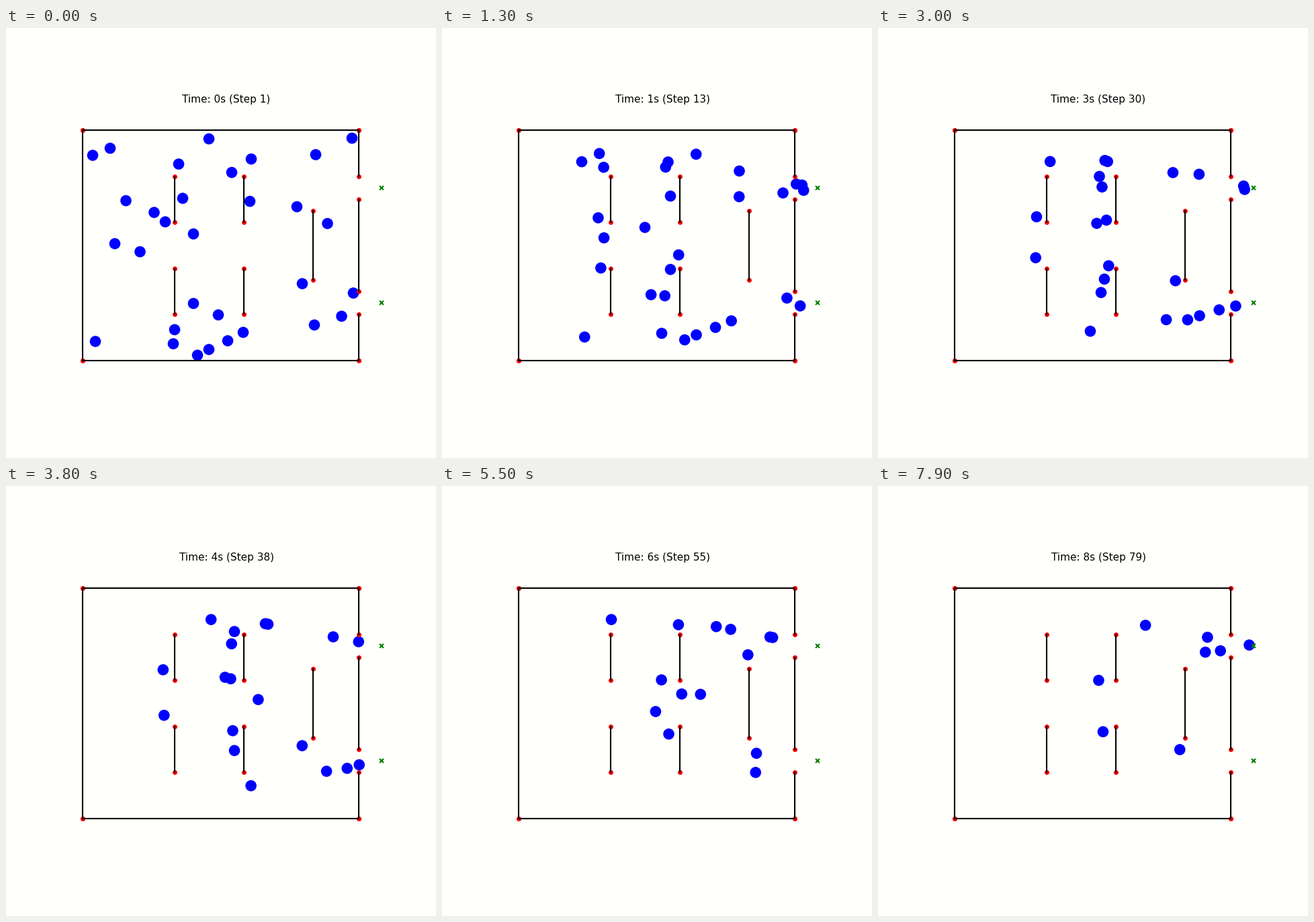
Animation of 640x640 px, one loop 8 s. Source, as a matplotlib script:

```python
import matplotlib.pyplot as plt
import numpy as np
from matplotlib.animation import FuncAnimation
from matplotlib.patches import Circle

FRAMES, SPEED = 80, 6.12          # pixels walked per frame
UNIT, LEFT, BOTTOM = 34.23, 114.4, 494.6
RADIUS = 8.3


def to_px(x, y):
    return LEFT + UNIT * x, BOTTOM - UNIT * y


# Inner walls: column, upper end, lower end
INNER = [(4, 8, 6), (4, 4, 2), (7, 8, 6), (7, 4, 2), (10, 6.5, 3.5)]
WALLS = [
    ((0, 0), (0, 10)), ((0, 10), (12, 10)), ((0, 0), (12, 0)),
    ((12, 10), (12, 8)), ((12, 7), (12, 3)), ((12, 2), (12, 0)),
] + [((x, a), (x, b)) for x, a, b in INNER]
DOORS = [to_px(13, 7.5), to_px(13, 2.5)]
GATE_X = to_px(12, 0)[0]

# Starting places of those who walk straight out
FREE = [
    (155, 179), (302, 165), (257, 202.5), (365, 195), (461, 188.5),
    (515, 164), (178.5, 257), (363, 258), (433, 266), (478.5, 291),
    (441, 380.5), (517, 394.5), (499.5, 429), (459, 442), (249, 470),
    (133, 466.5), (285, 487), (302, 478.5), (330, 465.5), (353, 453),
]
# Start, door (0 upper, 1 lower), column that holds them up, frames held
HELD = [
    ((129, 189.5), 0, 4, 9), ((336, 215), 0, 7, 38),
    ((220.5, 274.5), 0, 4, 40), ((237, 288.5), 0, 7, 90),
    ((263, 253.5), 0, 7, 35), ((279, 306.5), 1, 10, 20),
    ((162, 321), 0, 7, 20), ((199.5, 333), 1, 4, 35),
    ((279, 410), 0, 7, 16), ((316, 427), 0, 7, 32),
    ((251, 449), 0, 7, 90),
]

rng = np.random.default_rng(4)


def shuffle(n):
    """Random walk that ends where it began, never into the wall."""
    drift = np.cumsum(rng.normal(0, 2.5, (n, 2)), axis=0)
    drift -= np.linspace(drift[0], drift[-1], n)
    drift[:, 0] = -abs(drift[:, 0])
    return drift


def walk(start, door, column=None, wait=0):
    """Positions per frame: round the wall ends, through the gate, to the door."""
    door_x, door_y = DOORS[door]
    keys, hold = [(0, *start)], None

    def go(x, y):
        t, x0, y0 = keys[-1]
        keys.append((t + np.hypot(x - x0, y - y0) / SPEED, x, y))

    def gate_y():
        return np.clip(keys[-1][2], door_y - 6, door_y + 6)

    for col, a, b in INNER:
        wall_x, top = to_px(col, a)
        low = to_px(col, b)[1]
        x, y = keys[-1][1:]
        if x >= wall_x:
            continue
        hit = y + (gate_y() - y) * (wall_x - x) / (GATE_X - x)
        if not top - 20 < hit < low + 20:
            continue
        if col == column:
            go(wall_x - 14, hit)
            t = keys[-1][0]
            hold = int(np.ceil(t))
            keys.append((t + wait, wall_x - 14, hit))
        deep = top + 10 < hit < low - 10
        over = door == 0 if deep else hit - top < low - hit
        go(wall_x, top - 22 if over else low + 22)

    go(GATE_X, gate_y())
    go(door_x, door_y)
    t, x, y = np.array(keys).T
    frames = np.arange(min(FRAMES, int(t[-1] - 5 / SPEED) + 1))
    path = np.column_stack([np.interp(frames, t, x), np.interp(frames, t, y)])
    if hold is not None:
        part = path[hold:hold + wait]
        part += shuffle(wait)[:len(part)]
    return path


def nearest(start):
    return int(np.argmin([np.hypot(x - start[0], y - start[1]) for x, y in DOORS]))


paths = [walk(p, nearest(p)) for p in FREE] + [walk(*h) for h in HELD]

fig = plt.figure(figsize=(6.4, 6.4), dpi=100, facecolor="#fffffc")
ax = fig.add_axes([0, 0, 1, 1])
ax.set(xlim=(0, 640), ylim=(640, 0))
ax.axis("off")

for ends in WALLS:
    xs, ys = zip(*(to_px(*p) for p in ends))
    ax.plot(xs, ys, "ro", ms=4, zorder=2)
    ax.plot(xs, ys, "k-", lw=1.5, zorder=3)
ax.plot(*zip(*DOORS), "x", color="green", ms=4, mew=1.5, zorder=3)

dots = [ax.add_patch(Circle(p[0], RADIUS, fc="blue", lw=0, zorder=1)) for p in paths]
title = ax.text(328, 110.6, "", ha="center", va="baseline",
                fontsize=11, family="DejaVu Sans")


def draw(i):
    step = max(1, i)
    title.set_text(f"Time: {step * 0.1:.0f}s (Step {step})")
    for dot, path in zip(dots, paths):
        dot.set_visible(i < len(path))
        if i < len(path):
            dot.center = path[i]
    return [title, *dots]


anim = FuncAnimation(fig, draw, frames=FRAMES, interval=100, repeat=True)
plt.show()
```
